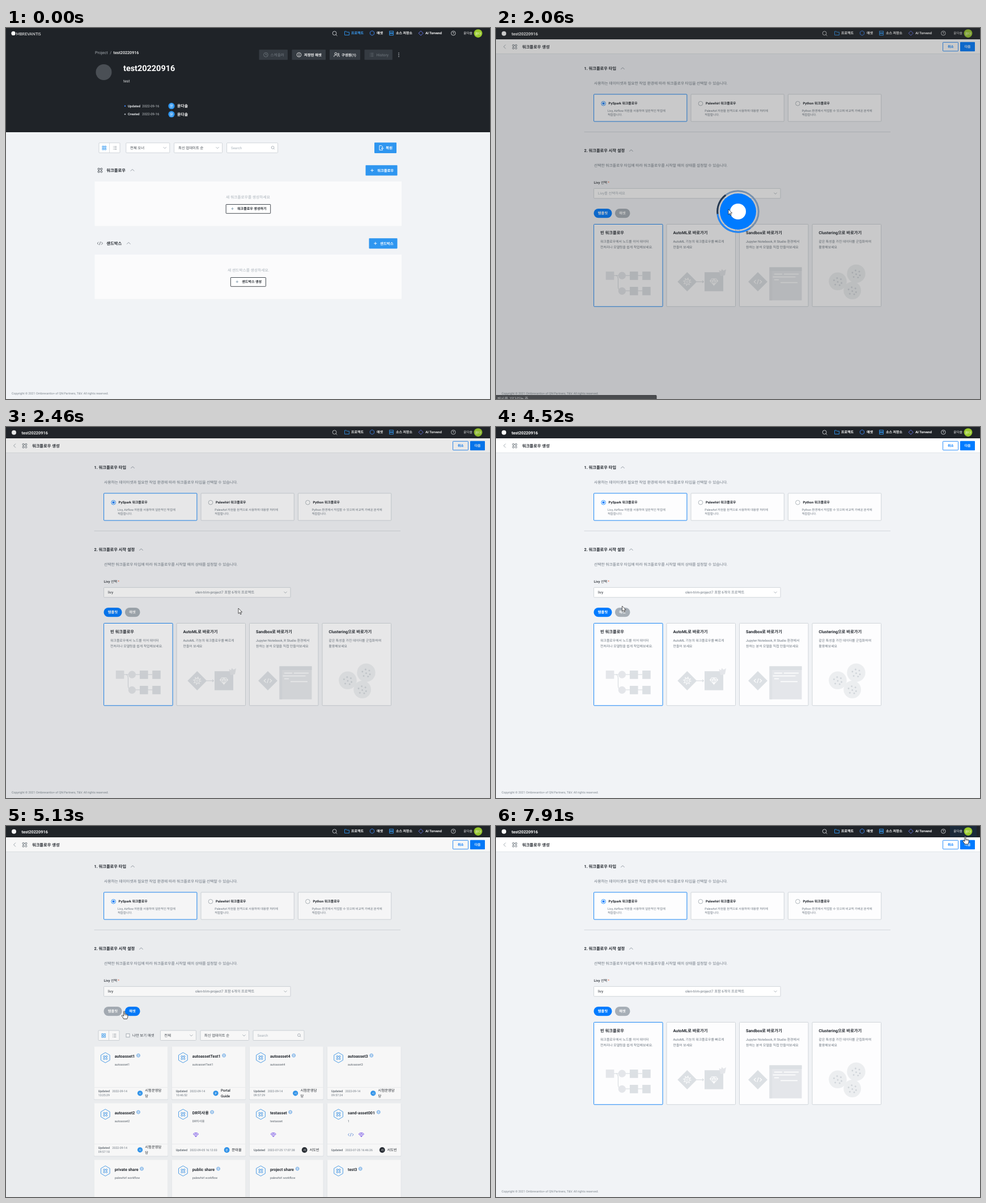
Recreate the animation shown at these times as an HTML page. Size 854 by 655 pixels, loop 8000 ms.

```html
<!DOCTYPE html>
<html>
<head>
<meta charset="utf-8">
<title>Workflow creation</title>
<style>
html, body { margin: 0; width: 100%; height: 100%; overflow: hidden; background: #f1f3f6; }
svg { display: block; width: 854px; height: 655px; }
text { font-family: Roboto, "Noto Sans CJK KR", "Noto Sans CJK", sans-serif; text-rendering: geometricPrecision; white-space: pre; }
</style>
</head>
<body>
<svg id="stage" viewBox="0 0 854 655" xmlns="http://www.w3.org/2000/svg"></svg>
<script>
const INK = '#22272e', GREY = '#6c7680', PALE = '#a9b2ba', LINE = '#d0d5da';
const SKY = '#2f96f0', BLUE = '#007bff', DARK = '#1f2328', PAGE = '#f1f3f6';

// Drawing helpers; text is placed by its vertical centre
const T = (x, y, size, str, fill = INK, weight = 400, anchor = 'start') =>
  `<text x="${x}" y="${y + size * 0.36}" font-size="${size}" fill="${fill}" font-weight="${weight}" text-anchor="${anchor}">${str}</text>`;
const R = (x, y, w, h, fill, stroke = 'none', rx = 0) =>
  `<rect x="${x}" y="${y}" width="${w}" height="${h}" rx="${rx}" fill="${fill}" stroke="${stroke}"/>`;
const C = (x, y, r, fill, stroke = 'none', w = 0.8) =>
  `<circle cx="${x}" cy="${y}" r="${r}" fill="${fill}" stroke="${stroke}" stroke-width="${w}"/>`;
const P = (d, stroke, w = 0.8, fill = 'none') =>
  `<path d="${d}" stroke="${stroke}" stroke-width="${w}" fill="${fill}"/>`;
const G = (id, ...parts) => `<g id="${id}">${parts.join('')}</g>`;
const each = (list, fn) => list.map(fn).join('');

// Icons
const plus = (x, y, c, r = 2.6) => P(`M${x - r} ${y}h${2 * r}M${x} ${y - r}v${2 * r}`, c, 0.9);
const chevron = (x, y, dir = 1, c = '#7b858e', r = 3.2) =>
  P(`M${x - r} ${y + dir * r / 2}L${x} ${y - dir * r / 2}L${x + r} ${y + dir * r / 2}`, c);
const lens = (x, y, r, c) => C(x, y, r, 'none', c) + P(`M${x + r * 0.7} ${y + r * 0.7}l${r * 0.7} ${r * 0.7}`, c);
const hexagon = (x, y, r, c, w) =>
  P(`M${x} ${y - r}l${r * 0.87} ${r / 2}v${r}l${-r * 0.87} ${r / 2}l${-r * 0.87} ${-r / 2}v${-r}Z`, c, w);
const nodes = (x, y, k, c) => `<g transform="translate(${x} ${y}) scale(${k})">` +
  each([[-4, -4], [1, -4], [-4, 1]], p => R(p[0], p[1], 3, 3, 'none', c, 0.8)) +
  C(2.5, 2.5, 1.6, 'none', c, 1) + P('M-1 -2.5H1M-2.5 -1V1M2.5 -1V1', c, 0.8) + '</g>';
const tags = (x, y, c, k = 1) => `<g transform="translate(${x} ${y}) scale(${k})">` +
  P('M-2.4 -2.3L-4.8 0L-2.4 2.3M2.4 -2.3L4.8 0L2.4 2.3M.9 -3L-.9 3', c) + '</g>';
const gem = (x, y, c, k = 1) => `<g transform="translate(${x} ${y}) scale(${k})">` +
  P('M-2.6 -3.4H2.6L4.6 -1L0 4L-4.6 -1ZM-4.6 -1H4.6M-1.7 -1L0 4L1.7 -1L0 -3.4Z', c, 0.7) + '</g>';
const globe = (x, y) => C(x, y, 3, 'none', '#3e92e6', 0.6) +
  P(`M${x - 3} ${y}h6M${x} ${y - 3}c-2 2 -2 4 0 6c2 -2 2 -4 0 -6`, '#3e92e6', 0.5);
const listIcon = (x, y, c) => P(`M${x - 3} ${y - 2.6}h1M${x - 3} ${y}h1M${x - 3} ${y + 2.6}h1` +
  `M${x - 1} ${y - 2.6}h4.4M${x - 1} ${y}h4.4M${x - 1} ${y + 2.6}h4.4`, c, 0.7);
const avatar = (x, y, r, str, fill = SKY, size = r * 1.25) => C(x, y, r, fill) + T(x, y, size, str, '#fff', 500, 'middle');

const button = (x, y, w, h, str, size, tx, fill, c = '#fff', stroke = 'none') =>
  R(x, y, w, h, fill, stroke, 0.8) + T(tx, y + h / 2, size, str, c, 700);
const select = (x, y, w, str, tx) =>
  R(x, y, w, 17.5, '#fff', LINE, 1) + T(tx, y + 9, 6.4, str, '#3c434a') + chevron(x + w - 8.5, y + 8.7, -1, '#9aa3ab', 2.6);
const toggle = (x, y) => R(x, y, 37, 17.5, '#fff', LINE, 1) + P(`M${x + 18.5} ${y}v17.5`, LINE) +
  each([[0, 0], [4, 0], [0, 4], [4, 4]], p => R(x + 6 + p[0], y + 5.7 + p[1], 2.5, 2.5, 'none', SKY)
    .replace('/>', ' stroke-width=".8"/>')) + listIcon(x + 28, y + 9, '#7b858e');
const search = (x, y) => R(x, y, 90, 17.5, '#fff', LINE, 1) +
  T(x + 7.5, y + 9, 6.2, 'Search', PALE) + lens(x + 81, y + 8.2, 2.4, '#9aa3ab');
const footer = T(10, 645, 5.34, 'Copyright © 2021 Ombrevantis+ of QN Partners, T&amp;V. All rights reserved.', '#7d868e');

const nav = active => lens(579.6, 9.2, 3.4, '#e8eaec') +
  P('M597.5 12.5V6h3l1 1.3h4v5.2Z', SKY, 0.9) + T(609, 9, 6, '프로젝트', active ? '#3a9df5' : '#fff', 700) +
  hexagon(646, 9, 4.1, '#3d86f0', 0.9) + T(654, 9, 6.1, '애셋', '#fff', 700) +
  R(676.7, 5.6, 6.6, 3, 'none', SKY) + R(676.7, 9.6, 6.6, 3, 'none', SKY) + T(688, 9, 6, '소스 저장소', '#fff', 700) +
  P('M732 5.2l4 4l-4 4l-4 -4Z', '#6b7cf5', 0.9) + T(740, 9, 6, 'AI Torvend', '#fff', 700) +
  C(789.3, 9.2, 3.8, 'none', '#e8eaec') + T(789.3, 9.3, 5.4, '?', '#fff', 500, 'middle') +
  T(807.3, 9.3, 5.7, '윤다솔', '#fff') + avatar(833, 9.6, 7.4, '윤다', '#98c92c', 5.8);

// Project page
const person = y => avatar(292, y, 5.6, '윤', SKY, 7) + T(302, y, 6.9, '윤다솔', '#fff', 700);
const stamp = (y, str, c) => C(210, y, 1.2, c) + T(215, y, 5.85, str, '#dfe2e5', 700) +
  T(240.3, y, 5.95, '2022-09-16', '#c3c8cc') + person(y);
const panel = (y, msg, mx, x, w, str, tx, id) => R(156.5, y, 541.5, 78.5, '#fbfbfc') +
  T(mx, y + 27.5, 6.75, msg, PALE) + `<g id="${id}">` +
  R(x, y + 40.5, w, 15.8, '#fff', '#454b52', 0.6) + '</g>' +
  plus(tx - 8.5, y + 48, '#7f9aad', 2.2) + T(tx, y + 48, 6.05, str, INK, 700);

const project = G('project',
  R(0, 0, 854, 184, DARK), C(13, 9.4, 3.6, '#fff'),
  `<text x="17.8" y="12.6" font-size="7" fill="#fff" style="font-family:Lato,sans-serif">MBREVANTIS</text>`,
  nav(true),
  T(157, 43.8, 7.2, 'Project', '#a6acb2'), T(183.2, 43.8, 7.2, '/', '#a6acb2'), T(189.6, 43.8, 7.15, 'test20220916', '#fff', 500),
  C(172.5, 78, 14, '#4a4f55'),
  T(207, 71, 14.45, 'test20220916', '#fff', 700), T(207, 93.2, 6.7, 'test', '#e3e5e7'),
  stamp(137.7, 'Updated', '#3b82f0'), stamp(152.2, 'Created', '#aab0b6'),
  button(446.5, 38.3, 50.5, 18, '', 6, 0, '#353b42'), C(458.5, 47.3, 3.8, 'none', '#747b82'),
  P('M458.5 44.8v2.7h2', '#747b82'), T(466.5, 47.3, 6.6, '스케줄러', '#747b82'),
  button(504.5, 38.3, 59.5, 18, '저장된 애셋', 6.4, 526, '#353b42'), C(517, 47.3, 3.8, 'none', '#fff'),
  P('M517 45v1M517 46.7v2.9', '#fff', 1),
  button(571, 38.3, 54, 18, '구성원(1)', 6.4, 592, '#353b42'), C(581.8, 45.2, 1.8, 'none', '#fff'),
  P('M578.8 51v-1.5q0 -1.8 3 -1.8q2 0 2.6 1M585 51v-1.4q.3 -1.6 1.7 -1.6t1.5 1.6v1.4', '#fff'), C(586.4, 46, 1.3, 'none', '#fff'),
  button(632.5, 38.3, 49.3, 18, '', 6, 0, '#353b42'), listIcon(645, 47.3, '#747b82'), T(653.5, 47.3, 6.75, 'History', '#747b82'),
  each([44.3, 47.4, 50.5], y => C(693, y, 0.8, '#d0d4d8')),
  toggle(164, 202.8), select(211.8, 202.8, 77, '전체 오너', 219), select(296.6, 202.8, 85, '최신 업데이트 순', 304), search(389.6, 202.8),
  button(650, 202.3, 39, 18.6, '복원', 6.5, 670, SKY),
  P('M662.5 207.7h-3.6v7.8h5.6v-1.6M662.5 207.7l2 2v1.5M662.5 212.4h4M664 210.9l-1.6 1.5l1.6 1.5', '#fff', 0.9),
  nodes(166, 251.3, 0.95, '#4d545b'), T(177.3, 251, 7.3, '워크플로우', INK, 700), chevron(223, 251),
  button(634.5, 242.3, 56, 18.2, '워크플로우', 6.35, 655, SKY), plus(646, 251.4, '#fff'),
  panel(271, '새 워크플로우를 생성하세요', 388, 388.2, 78.5, '워크플로우 생성하기', 408, 'make'),
  tags(165.8, 380.2, '#4d545b'), T(177.3, 380, 7.3, '샌드박스', INK, 700), chevron(216.3, 380),
  button(640.5, 371.2, 50, 18.2, '샌드박스', 6.45, 660, SKY), plus(651.8, 380.3, '#fff'),
  panel(400, '새 샌드박스를 생성하세요.', 391, 396.4, 62, '샌드박스 생성', 416.3, 'box'),
  footer);

// Creation page
const option = (x, on, title, a, b) => R(x, 117, 164.3, 48, '#fdfdfe', on ? '#1a86f5' : LINE, 1) +
  C(x + 17, 133.3, 3.8, '#fff', on ? BLUE : '#98a1a9') + (on ? C(x + 17, 133.3, 2, BLUE) : '') +
  T(x + 26, 133, 5.95, title, INK, 700) + T(x + 24.3, 146, 5.34, a, GREY) + T(x + 24.3, 152.8, 5.34, b, GREY);
const heading = (y, str, cx) => T(155.5, y, 7.25, str, INK, 700) + chevron(cx, y + 0.4);
const card = (x, on, title, a, b) => R(x, 346.5, 121.5, 145.3, '#fdfdfe', on ? '#1a86f5' : LINE, 1) +
  T(x + 11.5, 361.8, 7.28, title, INK, 700) + T(x + 11.5, 377.3, 5.9, a, GREY) + T(x + 11.5, 386.8, 5.9, b, GREY);
const diamond = (x, y, r, c) => P(`M${x} ${y - r}l${r} ${r}l${-r} ${r}l${-r} ${-r}Z`, 'none', 0, c);
const LIGHT = '#e4e6ea', MID = '#dce0e4';
const spots = [[-6, -2], [-1, -6], [5, -4], [0, 1], [6, 3], [-4, 6], [3, 7]];
const cluster = (x, y, r) => C(x, y, r, '#eceef0') +
  each(spots, p => diamond(x + p[0] * 1.1, y + p[1] * 0.95, 1.8, '#cfd4d9'));

const art = [
  P('M208 437H258M212 437q3.5 1 3.5 6v14q0 7 7 7H260', '#cfd4d9', 0.9),
  R(193.8, 430, 14.6, 14.6, LIGHT), C(222.4, 437.2, 6.6, LIGHT), C(222.4, 464.3, 6.6, LIGHT),
  each([[236, 430], [258.2, 430], [236, 457], [258.2, 457]], p => R(p[0], p[1], 14.6, 14.8, MID)),
  diamond(337.3, 448, 17, MID), C(337.3, 448, 4.4, 'none', '#fff', 1.1), C(337.3, 448, 1.7, 'none', '#fff'),
  `<circle cx="337.3" cy="448" r="6.2" fill="none" stroke="#fff" stroke-width="1.6" stroke-dasharray="1.6 3.27"/>`,
  P('M354 448H366M364 446l2.5 2l-2.5 2', '#cfd4d9', 1), R(368, 431.2, 33, 33.5, MID), gem(384.5, 448, '#fff', 1.5),
  P('M393.5 427.5l3.5 2l1.5 -4l3 3l4.5 -2.5l-2 10.5l-8 1.5Z', 'none', 0, LIGHT),
  diamond(462, 448, 17, MID), tags(462, 448, '#fff', 1.4),
  R(482.5, 422.5, 57, 58.3, LIGHT), R(482.5, 422.5, 57, 6.5, MID), R(482.5, 429, 4.8, 51.8, '#dfe2e6'),
  P('M491 434.5h14M508 434.5h26M488.5 439.5h40M491 444.5h8M502 449.5h30', '#fff', 1.5),
  cluster(603, 447.3, 15.8), cluster(635.5, 433.8, 16.2), cluster(628.7, 463.5, 15.4)
].join('');

const templates = G('templates',
  card(172.6, true, '빈 워크플로우', '워크플로우에서 노드를 이어 데이터', '전처리나 모델링을 쉽게 작업해보세요.'),
  card(301, false, 'AutoML로 바로가기', 'AutoML 기능의 워크플로우를 빠르게', '만들어 보세요'),
  card(429.5, false, 'Sandbox로 바로가기', 'Jupyter Notebook, R Studio 환경에서', '원하는 분석 모델을 직접 만들어보세요'),
  card(558, false, 'Clustering으로 바로가기', '같은 특성을 가진 데이터를 군집화하여', '활용해보세요'),
  art, footer);

// Asset list
const owner = (x, y, dx, first, second, letter) => avatar(x + dx, y + 82.3, 4.6, letter, SKY, 5) +
  T(x + dx + 8.8, y + 77.3, 6.3, first, INK, 500) + T(x + dx + 8.8, y + 87, 6.3, second, INK, 500);
const admin = (x, y) => owner(x, y, 81, '시험운영담', '당', '시');
const guide = (x, y) => owner(x, y, 77.5, 'Portal', 'Guide', 'P');
const solo = (name, fill) => (x, y) => avatar(x + 97, y + 82.5, 4.9, name[0], fill, 5) + T(x + 105.7, y + 82.3, 6.3, name, INK, 500);
const moon = solo('문태율', SKY), seo = solo('서도빈', '#2a2f36');
const purple = '#7a55f0';
const items = [
  ['autoasset1', '', 78, '2022-09-14', '13:25:29', admin], ['autoassetTest1', '', 92, '2022-09-14', '10:46:52', guide],
  ['autoasset4', '', 78, '2022-09-14', '09:57:29', admin], ['autoasset3', '', 78, '2022-09-14', '09:57:24', admin],
  ['autoasset2', '', 78, '2022-09-14', '09:57:18', admin], ['DR미사용', '', 71, '2022-09-05 16:12:03', '', moon],
  ['testasset', '', 72, '2022-07-25 17:07:38', '', seo], ['sand-asset001', '1', 90.5, '2022-07-25 16:46:26', '', seo],
  ['private share', 'palewhirl workflow', 84], ['public share', 'palewhirl workflow', 82],
  ['project share', 'palewhirl workflow', 84.5], ['test3', ' ', 58.5]
];
const asset = ([title, sub, gx, day, hour, who], i) => {
  const x = 155.5 + 137.1 * (i % 4), y = 389.5 + 100 * Math.floor(i / 4);
  return R(x - 0.5, y + 0.5, 131, 93.5, '#dfe3e7', 'none', 1) + R(x, y, 130, 93, '#fff', 'none', 1) +
    hexagon(x + 19.8, y + 19.5, 9, '#3d97ea', 0.9) + nodes(x + 19.8, y + 19.5, 0.85, '#3d97ea') +
    T(x + 36.2, y + 17, 7.15, title, INK, 700) + globe(x + gx, y + 15.6) + T(x + 36.2, y + 31.5, 5.36, sub || title, '#59626b') +
    (day ? P(`M${x} ${y + 72}h130`, '#eceff1') + T(x + 7.2, y + (hour ? 78.7 : 82.5), 5.4, 'Updated', '#59626b', 500) +
      T(x + 32, y + (hour ? 78.7 : 82.5), 5.25, day, GREY) + T(x + 7.2, y + 85.7, 5.25, hour, GREY) + who(x, y) : '');
};
const assets = G('assets',
  toggle(163, 361), R(212, 366.8, 6, 6, '#fff', '#aab2b9'), T(223, 369.8, 6.4, '나만 보기 애셋', '#3c434a'),
  select(272.4, 361, 63, '전체', 279.3), select(343, 361, 85.5, '최신 업데이트 순', 349.8), search(436, 361),
  each(items, asset),
  gem(335, 545, purple), gem(471.7, 545, purple), tags(608.3, 545, '#4d7fd6'), gem(627, 545, purple));

const create = G('create',
  R(0, 0, 854, 655, PAGE), R(0, 20, 854, 25.5, '#fff'), P('M0 45.5H854', '#dde1e5'), R(0, 0, 854, 20, DARK),
  R(801, 0, 47, 19.5, '#1b2a3a').replace('<rect', '<rect id="profile"'),
  C(14, 9.8, 4, '#fff'), T(27.5, 10, 7.35, 'test20220916', '#fff', 700), nav(false),
  P('M17 29.5l-3.5 3.5l3.5 3.5', '#8a939b'), nodes(33, 33.2, 0.95, '#6d767e'), T(46, 33, 7.28, '워크플로우 생성', INK, 700),
  button(788.5, 25.3, 27, 15.5, '취소', 5.8, 796.9, '#fff', BLUE, '#2d8ffb'), button(819, 24.8, 26, 16.5, '다음', 5.9, 826.7, BLUE),
  heading(71, '1. 워크플로우 타입', 223.5),
  T(173, 98, 6.75, '사용하는 데이터셋과 필요한 작업 환경에 따라 워크플로우 타입을 선택할 수 있습니다.', GREY),
  option(172.6, true, 'PySpark 워크플로우', 'Livy, Airflow 자원을 사용하며 일반적인 작업에', '적합합니다.'),
  option(344, false, 'Palewhirl 워크플로우', 'Palewhirl 자원을 원격으로 사용하며 대용량 처리에', '적합합니다.'),
  option(515.4, false, 'Python 워크플로우', 'Python 환경에서 작업할 수 있으며 비교적 가벼운 분석에', '적합합니다.'),
  P('M155.5 183.5H696', '#cdd2d7'),
  heading(216, '2. 워크플로우 시작 설정', 238.5),
  T(173, 243, 6.75, '선택한 워크플로우 타입에 따라 워크플로우를 시작할 때의 상태를 설정할 수 있습니다.', GREY),
  T(172.8, 273, 6, 'Livy 선택', INK, 500), T(197.3, 273, 6, '*', '#f0653a', 500),
  R(172.6, 283.3, 329.4, 17.5, '#fff', LINE, 1).replace('<rect', '<rect id="field"'), chevron(493, 292, -1, '#9aa3ab', 2.6),
  G('empty', T(180, 292, 6.4, 'Livy를 선택하세요', PALE)),
  G('filled', T(180, 292, 6.35, 'livy'), T(334, 292, 6.3, 'olen-trim-project7 포함 6개의 프로젝트', GREY)),
  `<rect id="pillA" x="172.5" y="319" width="32" height="16.3" rx="8.1"/>`, T(179.8, 327, 6.3, '템플릿', '#fff', 700),
  `<rect id="pillB" x="210" y="319" width="26.5" height="16.3" rx="8.1"/>`, T(217.3, 327, 6.3, '애셋', '#fff', 700),
  templates, assets);

const loader = G('loader',
  C(427, 324, 36.3, 'none', '#7690ad', 3),
  G('ring', P('M395.56 342.15A36.3 36.3 0 0 1 427 287.7', '#2487f5', 3), P('M427 287.7A36.3 36.3 0 0 1 458.44 305.85', '#26384f', 3)),
  C(427, 324, 32, BLUE), C(427, 324, 14, '#fff'));
const status = G('status', R(-2, 648.5, 285, 10, '#4a4c4f', '#3d3f42', 1), T(2, 654, 7, '캐시를 기다리는 중...', '#c4c6c8'));
const cursor = G('cursor',
  G('arrow', P('M0 0V9.4L2.2 7.4L3.7 10.8L5.2 10.2L3.7 6.8H6.6Z', '#111', 0.7, '#fff')),
  G('hand', P('M-1 .6Q0 -.8 1 .6V5Q2 4.2 2.9 5.3Q4 4.7 4.7 5.8Q6 5.3 6.4 6.7V9.6Q6.2 11.5 5 13.6H-.8Q-2 11 -4 8.7Q-4.6 7.2 -3 7Q-2 7.4 -1 8.8Z', '#111', 0.8, '#fff'),
    P('M1 5V7.6M2.9 5.5V7.8M4.7 6V8', '#111', 0.5)));

document.getElementById('stage').innerHTML = R(0, 0, 854, 655, PAGE) + project + create +
  R(0, 0, 854, 655, '#333').replace('<rect', '<rect id="veil"') + loader + status + cursor;

const el = id => document.getElementById(id);
const show = (id, on) => { el(id).style.display = on ? '' : 'none'; };

// Piecewise linear track: rows of [time, ...values]
function track(rows, t) {
  const i = rows.findIndex(r => r[0] > t);
  if (i === 0) return rows[0].slice(1);
  if (i < 0) return rows[rows.length - 1].slice(1);
  const a = rows[i - 1], b = rows[i], k = (t - a[0]) / (b[0] - a[0]);
  return a.slice(1).map((v, j) => v + (b[j + 1] - v) * k);
}

const pointer = [
  [190, 798, 645], [520, 520, 450], [700, 390, 350], [800, 379, 325], [990, 404, 317], [1130, 404, 317], [1190, 408, 315],
  [1915, 408, 315], [1920, 410, 320], [2820, 410, 320], [3290, 389, 153], [3490, 389, 153], [4000, 300, 240],
  [4250, 245, 290], [4320, 245, 290], [4520, 222.7, 316], [4660, 208.5, 327], [5150, 208.5, 327], [5390, 180, 320],
  [5990, 180, 320], [6060, 200, 310], [6300, 400, 420], [6450, 350, 468], [6650, 192, 458], [6850, 192, 458],
  [7250, 430, 260], [7540, 645, 63], [7640, 669, 84], [7710, 690, 75], [7910, 827.8, 18.5]
];
const veil = [
  [1980, 0], [2120, 0.45], [2390, 0.45], [2460, 0.105], [2670, 0],
  [4860, 0], [4930, 0.4], [5000, 0.4], [5130, 0.04], [5390, 0]
];
const inside = (p, x, y, w, h) => p[0] >= x && p[0] <= x + w && p[1] >= y && p[1] <= y + h;
const between = (t, a, b) => t >= a && t < b;

function draw(t) {
  const p = track(pointer, t), dim = track(veil, t)[0];
  const first = t < 1985, listing = between(t, 4860, 5730);
  const onMake = first && inside(p, 388, 311, 79, 16);
  const onProfile = !first && inside(p, 801, 0, 47, 20);
  const onPill = !first && t > 2670 && inside(p, 172, 319, 65, 16);
  const onCard = t > 5730 && inside(p, 172, 346, 508, 146);

  show('project', first);
  show('create', !first);
  show('templates', !listing);
  show('assets', listing && t >= 5000);
  show('empty', t < 2400);
  show('filled', t >= 2400);
  show('profile', onProfile);
  el('make').firstChild.setAttribute('fill', onMake ? '#e9ecee' : '#fff');
  el('field').setAttribute('stroke', t > 2670 && inside(p, 172, 283, 330, 18) ? '#3d97f5' : LINE);
  el('pillA').setAttribute('fill', listing ? '#a6aeb6' : BLUE);
  el('pillB').setAttribute('fill', listing ? BLUE : '#a6aeb6');

  el('veil').setAttribute('opacity', dim);
  show('loader', between(t, 2050, 2420) || between(t, 4900, 5060));
  el('ring').setAttribute('transform', `rotate(${(t - 2330) * 0.36} 427 324)`);
  show('status', between(t, 1985, 2400));

  const hand = (onMake && t < 1720) || onProfile || onPill || onCard;
  show('cursor', t >= 190);
  show('hand', hand);
  show('arrow', !hand);
  el('cursor').setAttribute('transform', `translate(${p[0]} ${p[1]})`);
}

const start = performance.now();
function tick() {
  draw((performance.now() - start) % 8000);
  requestAnimationFrame(tick);
}
tick();
</script>
</body>
</html>
```
